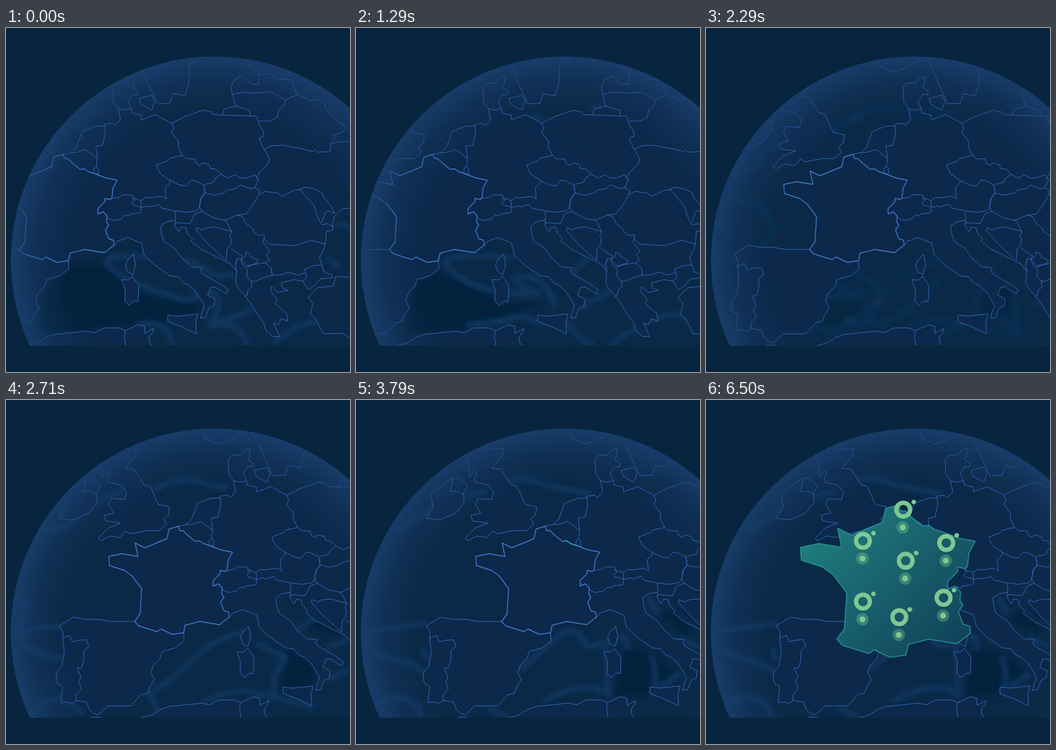
Animation of 640x640 px, one loop 6780 ms. Source, as an HTML page:

```html
<!DOCTYPE html>
<html lang="en">
<head>
<meta charset="utf-8">
<title>Globe turning to France</title>
<style>
html, body { margin: 0; height: 100%; overflow: hidden; background: #08253f; }
svg { display: block; width: 100%; height: 100%; }
.move { animation: 6780ms linear infinite both; }

#map { animation-name: slide; }
@keyframes slide {
  0% { transform: translateX(-246px); }
  7.23% { transform: translateX(-246px); animation-timing-function: ease-in-out; }
  50.88%, 100% { transform: none; }
}

#currents { fill: none; stroke: #174477; stroke-opacity: .5; stroke-width: 11; stroke-linecap: round; stroke-linejoin: round; }
#currents .deep { fill: #07233d; fill-opacity: .8; stroke: none; }
#sea1 { animation-name: sea1; }
#sea2 { animation-name: sea2; }
#sea3 { animation-name: sea3; }
#sea4 { animation-name: sea4; }
#sea5 { animation-name: sea5; }
@keyframes sea1 { 0%, 7.23% { opacity: 1; } 19.03%, 100% { opacity: 0; } }
@keyframes sea2 { 0%, 7.23% { opacity: 0; } 19.03% { opacity: 1; } 28.47%, 100% { opacity: 0; } }
@keyframes sea3 { 0%, 19.03% { opacity: 0; } 28.47% { opacity: 1; } 39.97%, 100% { opacity: 0; } }
@keyframes sea4 { 0%, 28.47% { opacity: 0; } 39.97% { opacity: 1; } 50.88%, 100% { opacity: 0; } }
@keyframes sea5 { 0%, 39.97% { opacity: 0; } 50.88%, 100% { opacity: 1; } }

.land { fill: #0c294b; }
.lines { fill: none; stroke: #3c6fc4; stroke-width: 1; stroke-linejoin: round; }
.lines .home { stroke: #4a86dc; stroke-width: 1.4; }

#lift { animation-name: lift; transform-origin: 337.5px 332px; }
@keyframes lift {
  0% { transform: none; stroke-width: 1.4px; }
  80.83% { transform: none; stroke-width: 1.4px; animation-timing-function: ease-in-out; }
  89.68%, 100% { transform: scale(1.412); stroke-width: .9px; }
}
#trace { fill: none; stroke: #2fb5b0; stroke-linejoin: round; stroke-dasharray: 1 2; animation-name: trace; }
@keyframes trace {
  0% { stroke-dashoffset: 1.002; }
  53.69% { stroke-dashoffset: 1.002; animation-timing-function: ease-in-out; }
  70.8%, 100% { stroke-dashoffset: 0; }
}
#spot { transform-origin: 350px 352px; animation-name: spot; }
@keyframes spot {
  0% { transform: scale(0); opacity: .68; }
  73.75% { transform: scale(0); opacity: .68; animation-timing-function: ease-in-out; }
  79.65%, 100% { transform: none; opacity: 1; }
}

#pins { animation-name: pins; }
@keyframes pins {
  0%, 87.8% { visibility: hidden; }
  87.81%, 100% { visibility: visible; }
}
#pins circle { fill: #7fc891; }
#pins .halo { fill-opacity: .35; }
#pins .ring { fill: none; stroke: #7fc891; stroke-width: 8; }
.pop { animation-name: pop; }
@keyframes pop {
  0% { transform: scale(0); }
  87.9% { transform: scale(0); animation-timing-function: ease-out; }
  92.33%, 100% { transform: none; }
}
</style>
</head>
<body>
<svg viewBox="0 0 640 640">
  <defs>
    <clipPath id="globe"><path d="M44 591A379 379 0 1 1 732 591Z"/></clipPath>
    <radialGradient id="rim" gradientUnits="userSpaceOnUse" cx="388" cy="432" r="379">
      <stop offset=".72" stop-color="#1b4070" stop-opacity="0"/>
      <stop offset=".88" stop-color="#1b4070" stop-opacity=".32"/>
      <stop offset="1" stop-color="#1b4070" stop-opacity=".85"/>
    </radialGradient>
    <linearGradient id="teal" x2="1" y2="1">
      <stop stop-color="#258e88"/>
      <stop offset="1" stop-color="#0a2a4b"/>
    </linearGradient>
    <filter id="soft" filterUnits="userSpaceOnUse" x="0" y="0" width="640" height="640"><feGaussianBlur stdDeviation="5"/></filter>

    <path id="france" pathLength="1" d="M411 271L399 267 392 262 384 263 369 251 361 243 355 243 352 235 335 240 331 258 290 275 272 266 277 291 247 286 223 291 224 308 252 317 266 327 284 351 281 398 271 412 278 420 313 431 320 426 341 436 362 433 365 419 392 412 429 418 447 404 446 395 437 392 431 376 437 367 433 361 434 350 427 342 417 346 417 336 430 323 430 317 440 319 443 316 445 298 453 283 432 279Z"/>
    <clipPath id="inFrance"><use href="#france"/></clipPath>

    <g id="west">
      <!-- Scandinavia -->
      <path d="M396 50L402 71 426 82 447 76 483 55 495 67 508 97 528 141 551 140 557 122 579 126 586 103 588 67 605 62 610 48"/>
      <path d="M497 53L489 62"/>
      <path d="M493 131L517 125 523 136 517 153 497 142Z"/>
      <path d="M455 150L446 138 445 110 452 103 468 102 474 95 485 89 485 104 481 111 492 118 490 125 482 123 473 137 479 150 466 153Z"/>
      <!-- British Isles -->
      <path d="M247 79L238 92 274 90 272 104 253 127 270 129 288 157 300 161 315 194 336 199 334 214 325 221 331 231 317 243 293 243 263 249 254 244 244 256 225 253 208 262 203 257 222 238 245 229 217 225 214 215 232 210 222 194 228 183 252 185 256 171 245 158 222 153 220 147 225 138 221 132 211 143 209 118 203 105 206 90"/>
      <path d="M139 175L176 148 181 145 194 146 208 160 200 173 201 191 186 210 156 223 130 220 144 200Z"/>
      <path d="M179 147L180 155 174 170 190 170 200 175"/>
      <!-- Low Countries -->
      <path d="M352 235L366 232 377 222 388 192 412 183 430 182 431 195 426 218 413 220 416 243 414 258"/>
      <path d="M366 232L379 231 394 226 409 237 416 243"/>
      <path d="M410 261L414 258 418 262 418 272 409 270Z"/>
      <path d="M428 183L430 179 443 177 450 181 459 171 455 150"/>
      <path d="M479 150L480 158 497 162 498 171 524 161 554 177"/>
      <!-- Iberia -->
      <path d="M271 412L225 412 205 408 180 408 157 404 131 420 138 432 137 443 140 470 135 496 126 506 125 520 128 528 137 532 134 563 149 562 154 565 162 559 181 562 187 576 194 583 203 586 221 569 264 569 282 549 295 545 299 534 308 520 301 508 306 493 318 481 322 468 347 461 363 448 362 433"/>
      <path d="M137 443L150 438 155 450 166 447 181 446 186 458 177 466 176 486 172 498 164 499 171 515 167 525 172 537 162 548 162 559"/>
      <path d="M190 590L207 590"/>
    </g>

    <g id="east" transform="translate(246)">
      <!-- Germany, Switzerland, Austria, Czechia -->
      <path d="M308 177L312 187 308 194 321 211 320 221 328 237 306 242 301 247 280 255 287 271 306 284 303 291 296 297 298 318 290 313 268 316 260 315 251 321 236 316 235 311 217 310 211 315 196 317"/>
      <path d="M235 317L240 320 234 325 236 329 251 333 252 341 249 344 231 346 229 350 222 348 213 356 200 358 189 354 186 347"/>
      <path d="M251 321L252 334 264 331 268 333 284 328 289 335 313 340 336 343 354 340 359 336 363 317 370 308 368 292 352 284 344 283 335 294 323 292 306 284"/>
      <path d="M328 237L335 243 351 244 354 252 361 256 365 251 378 254 380 261 391 263 400 272 390 279 386 287 370 291"/>
      <path d="M400 272L413 279 426 273 435 279 447 279 463 273 469 283 463 297 455 299 436 292 427 299 413 301 405 307 387 311 370 307 368 292"/>
      <!-- Poland and the Baltics -->
      <path d="M308 177L332 165 366 153 382 156 385 161 403 162 466 164 472 181 479 193 480 201 471 205 478 222 490 242 488 252 473 267 466 278 472 284"/>
      <path d="M403 161L406 151 427 145 453 153 455 164"/>
      <path d="M427 145L425 137 421 124 440 119 461 121 493 119 505 125 520 134 517 145 508 151 504 167 491 173 470 173"/>
      <path d="M421 124L419 110 424 97 440 89 457 105 470 105 470 88 488 84 504 94 532 97 541 124 520 134"/>
      <path d="M448 50L452 71 466 79 470 75 470 88"/>
      <path d="M510 94L522 95 528 88 524 78"/>
      <!-- Belarus and Ukraine -->
      <path d="M541 124L562 132 566 135 576 132 593 139 595 151 610 166 620 177 627 179 632 186 626 193 610 200 612 206 604 214 603 230 580 231 575 226 571 230 553 225 515 218 495 219 479 226"/>
      <path d="M604 216L618 212 650 210"/>
      <path d="M463 297L472 303 470 310 482 304 504 307 513 313 536 302 548 301"/>
      <path d="M545 300L558 296 575 300 588 307 592 317 604 330 612 345 597 340 594 343 587 362"/>
      <path d="M607 370L610 352 625 337 655 333"/>
      <!-- Hungary, Romania, Bulgaria -->
      <path d="M370 307L362 317 360 333 365 341 385 353 407 358 430 348 447 346 462 325 470 310"/>
      <path d="M548 301L562 318 573 330 583 360 588 366 598 364 609 370 607 377 596 378 594 402 568 395 536 405 490 402 480 392 481 384 471 386 461 379 459 373 447 364 440 351 430 348"/>
      <path d="M480 392L478 398 491 415 484 422 490 432 483 437 494 448 495 460 514 459 525 454 543 460 558 455 555 449 572 442 588 441 583 428 592 410 594 402"/>
      <!-- Adriatic and Balkans -->
      <path d="M201 405L207 397 226 390 252 400 257 422 275 440 305 461 321 463 331 475 340 478 353 490 362 504 369 517 364 530 362 540 371 539 377 522 387 517 389 504 375 497 381 482 389 482 410 495 413 487 401 478 365 457 362 451 365 446 345 444 327 428 314 410 294 397 289 382 288 368 300 360 314 358 316 354 314 341"/>
      <path d="M314 358L316 364 313 364 318 375 322 379 326 370 335 372 337 382 347 392 344 396 362 411 378 419 406 433 418 439 430 453"/>
      <path d="M316 362L342 364 346 357 351 346 365 341"/>
      <path d="M355 371L365 376 373 372 389 370 414 377 420 378 416 387 419 392 418 403 411 411 410 432 400 424 376 402 354 377Z"/>
      <path d="M407 356L414 367 419 379"/>
      <path d="M418 409L428 417 440 424 437 430 430 429 427 440"/>
      <path d="M437 430L445 425 446 417 453 420 456 426 469 432 466 438 448 443 438 432"/>
      <path d="M430 430L427 440 429 453 427 473 432 484 445 499 449 497 450 488 458 481 456 471 448 462 449 450 440 440 437 430"/>
      <path d="M448 445L460 440 483 437 494 448 495 460 481 464 460 472 456 470"/>
      <!-- Greece and Turkey -->
      <path d="M445 499L455 512 467 531 480 550 484 564 496 574 509 574 498 549 507 552 512 541 524 545 522 531 500 512 505 506 492 489 494 481 506 492 525 488 515 484 512 474 536 468 553 471 560 462 558 456"/>
      <path d="M588 441L591 453 607 460 607 465 585 467 575 478 563 487 555 476 553 471"/>
      <path d="M660 465L613 462 609 480 580 483 562 501 571 513 566 532 576 541 590 569 626 568 640 578 660 584"/>
      <!-- Islands and Africa -->
      <path d="M237 421L241 440 236 459 226 453 222 441 226 432Z"/>
      <path d="M215 468L227 469 235 462 247 479 246 509 238 508 229 516 221 508 222 488Z"/>
      <path d="M301 534L319 536 357 532 353 548 354 569 330 557 301 546Z"/>
      <path d="M35 592L57 586 75 575 90 570 150 564 164 567 182 558 210 558 222 563 246 552 258 555 258 568 275 559 273 566 266 575 267 585 273 592"/>
      <path d="M222 563L220 575 223 592"/>
    </g>
  </defs>

  <g clip-path="url(#globe)">
    <path fill="#0a2946" d="M0 0H640V640H0Z"/>
    <g id="currents" filter="url(#soft)">
      <g id="sea1" class="move">
        <path class="deep" d="M120 440L190 440 270 500 360 510 350 545 250 550 60 570 70 490Z"/>
        <path d="M188 438Q185 425 220 424T350 435Q370 452 395 462L450 455M188 440Q215 465 250 478T330 505Q375 508 345 480M250 550Q305 545 310 590M375 490Q405 500 395 520T380 555Q430 540 450 590M380 550Q430 540 465 520M500 585Q540 550 580 545M600 430L620 445M610 362L640 370"/>
      </g>
      <g id="sea2" class="move">
        <path class="deep" d="M150 450L240 490 270 515 350 510 300 530 200 560 90 570 110 480Z"/>
        <path d="M165 438Q165 425 220 424T290 430M165 440Q200 475 240 485T340 495Q270 465 310 462T370 515M210 552Q270 548 290 540T330 545L395 550Q415 580 440 590M420 520L470 490M475 590Q510 560 560 540T630 560M50 265L80 275M400 460L430 430M330 165L345 168M440 150L455 145"/>
      </g>
      <g id="sea3" class="move">
        <path class="deep" d="M190 490L280 505 295 545 220 555 150 560Z"/>
        <path d="M205 220Q250 172 290 167M10 275L100 255M40 300Q45 325 80 325T125 380L105 405M190 485Q220 510 290 495Q200 475 265 440Q285 455 310 475T300 550M150 560Q190 545 220 560T260 545L330 550Q400 515 430 470M415 590Q450 560 500 540T580 570L570 500M440 410L460 395M490 430L540 460M420 150L455 160M370 160L385 150"/>
      </g>
      <g id="sea4" class="move">
        <path class="deep" d="M525 460L570 490 570 530 510 545ZM545 420L620 390 630 440Z"/>
        <path d="M275 168Q330 135 375 158L420 165M60 240L110 238Q150 190 215 170M10 370L45 380Q30 410 20 435Q60 420 100 422M20 440Q60 480 105 480M40 590Q70 550 110 555L140 580M265 545Q300 530 345 485T450 430M270 550L285 585M370 560Q430 530 480 550L570 570M500 545Q490 520 520 480L470 455M540 430L575 405M600 520L640 500M600 460L640 445"/>
      </g>
      <g id="sea5" class="move">
        <path class="deep" d="M500 460L550 470 600 510 550 550 480 550ZM560 400L620 390 620 440Z"/>
        <path d="M285 150Q320 140 350 158L440 175M65 238L85 238Q130 215 150 190L240 170M10 430Q70 425 130 415M15 455Q50 480 80 485T130 510M30 590Q30 555 75 555T120 590M125 465L130 480M250 575L280 590M308 500Q340 470 375 440T430 460L500 440 505 460M350 560Q430 515 470 550L465 460M550 480Q565 520 550 545L600 510M545 370L560 395M605 445L640 460M15 370V385"/>
      </g>
    </g>
    <g id="map" class="move">
      <g class="land">
        <path d="M271 412L335 240 430 182 553 177 665 150 667 124 720 60 1000 60 1000 310 856 352 840 400 834 441 801 455 740 470 691 499 676 470 656 432 600 371 562 358 447 400 362 433Z"/>
        <use href="#west"/><use href="#east"/><use href="#france"/>
      </g>
      <g class="lines"><use href="#west"/><use href="#east"/><use class="home" href="#france"/></g>
    </g>
    <circle cx="388" cy="432" r="379" fill="url(#rim)"/>
  </g>

  <g id="lift" class="move">
    <g clip-path="url(#inFrance)"><circle id="spot" class="move" cx="350" cy="352" r="150" fill="url(#teal)"/></g>
    <use id="trace" class="move" href="#france"/>
  </g>
  <g id="pins" class="move"></g>
</svg>
<script>
const spots = [[367, 204], [292, 262], [447, 266], [371.5, 299], [292, 375], [442, 368], [359.5, 404]];
const dot = (x, y, r, name = '') => `<circle class="${name}" cx="${x}" cy="${y}" r="${r}"/>`;
const pop = (x, y, delay, body) =>
  `<g transform="translate(${x} ${y})"><g class="move pop" style="animation-delay:${delay}ms">${body}</g></g>`;

document.getElementById('pins').innerHTML = spots.map(([x, y], i) =>
  pop(x - 1, y + 33, i * 25, dot(0, 0, 11.5, 'halo') + dot(0, 0, 5.5)) +
  pop(x, y, 60 + i * 30, dot(0, 0, 12.8, 'ring') + dot(19.5, -14.3, 4.3))
).join('');
</script>
</body>
</html>
```
